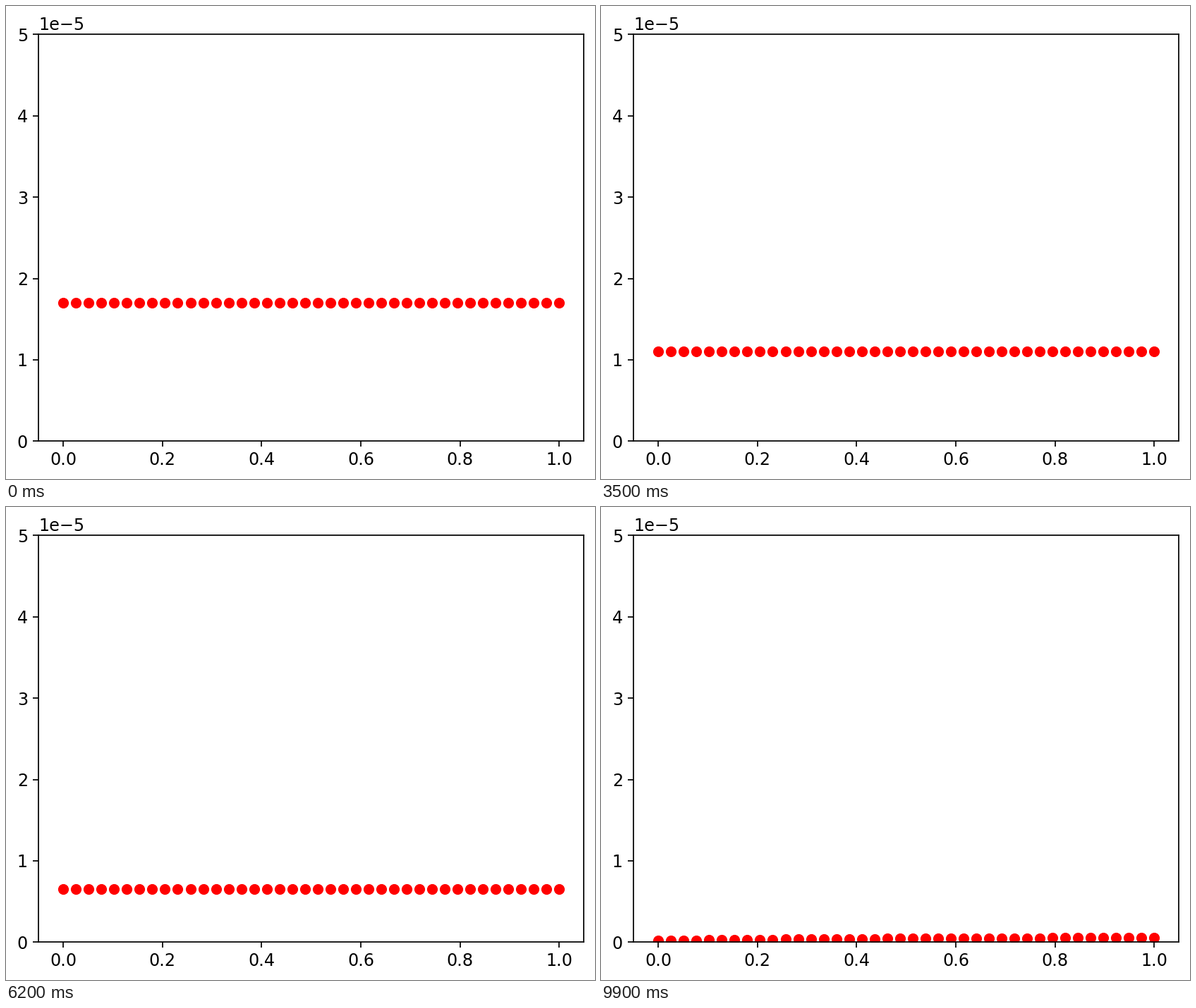
Animation, 835 px wide and 671 px high, one loop 10000 ms. Source, as a matplotlib script:

```python
import numpy as np
import matplotlib.pyplot as plt
from matplotlib.animation import FuncAnimation

W, H, DPI = 835, 671, 156
FRAMES, INTERVAL = 100, 100
UNIT = 1e-5

plt.rcParams.update({"font.family": "DejaVu Sans", "font.size": 11})
fig = plt.figure(figsize=((W + 0.01) / DPI, (H + 0.01) / DPI), dpi=DPI)
ax = fig.add_axes([46.1 / W, 53.7 / H, 773.3 / W, 576.9 / H])

x = np.linspace(0, 1, 40)
bulge = x * (2 - x)


def height(k):
    """Level falls steadily; the right side lags behind at the very end."""
    level = 1.7 - 0.01695 * k
    lag = (k / (FRAMES - 1)) ** 14
    return UNIT * (level + lag * (0.034 * bulge - 0.004))


dots, = ax.plot(x, height(0), "ro")
ax.set_xlim(-0.05, 1.05)
ax.set_ylim(0, 5 * UNIT)


def update(k):
    dots.set_ydata(height(k))
    return dots,


anim = FuncAnimation(fig, update, frames=FRAMES, interval=INTERVAL,
                     repeat=True, repeat_delay=0)
plt.show()
```
